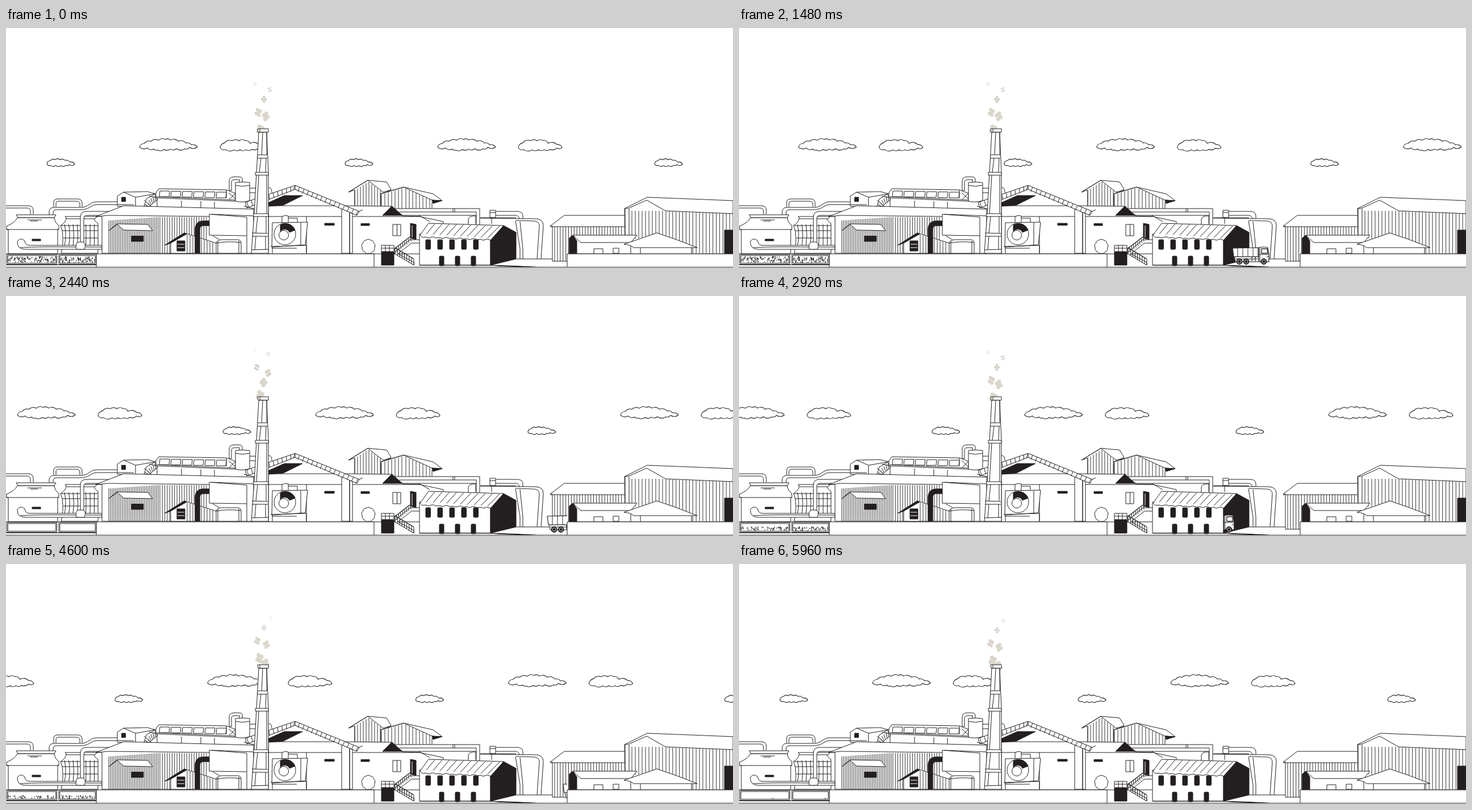
Write an HTML page that moves like this. It is 1280x424 px and loops after 6000 ms.

```html
<!DOCTYPE html>
<html lang="en">
<head>
<meta charset="utf-8">
<title>Factory skyline</title>
<style>
html, body { margin: 0; width: 100%; height: 100%; overflow: hidden; background: #fff; }
svg { display: block; width: 1280px; height: 424px; }
</style>
</head>
<body>
<svg id="stage" viewBox="0 0 1280 424" fill="none" stroke="#231f20" stroke-width="1" stroke-linejoin="round"></svg>
<script>
const INK = '#231f20', LOOP = 6000, STEP = 40;
const out = [];
const add = s => out.push(s);
const shape = (d, fill = '#fff', w = 1) => add(`<path d="${d}" fill="${fill}" stroke-width="${w}"/>`);
const line = (d, w) => shape(d, 'none', w);
const dark = d => shape(d, INK);
const box = (x, y, w, h, fill = '#fff', r = 0) =>
  add(`<rect x="${x}" y="${y}" width="${w}" height="${h}" rx="${r}" fill="${fill}"/>`);
const layer = id => add(`<g id="${id}"></g>`);
const mix = (a, b, k) => a + (b - a) * k;
const range = (n, f) => Array.from({ length: n }, (_, i) => f(i));

function seeded(s) {
  return () => (s = (s * 16807) % 2147483647) / 2147483647;
}

// Upright lines from a straight roof edge (x0, y0)-(x1, y1) down to the bottom.
function hatch(x0, y0, x1, y1, step, bottom, w = .9) {
  let d = '';
  for (let x = x0; x <= x1; x += step) d += `M${x.toFixed(1)} ${mix(y0, y1, (x - x0) / (x1 - x0)).toFixed(1)}V${bottom}`;
  line(d, w);
}

// Short strokes between the edges a-b and c-e.
function rungs(n, a, b, c, e) {
  line(range(n + 1, i => {
    const at = (p, q) => `${mix(p[0], q[0], i / n)} ${mix(p[1], q[1], i / n)}`;
    return `M${at(a, b)}L${at(c, e)}`;
  }).join(''));
}

// Closed outline of shallow outward bumps.
function puffy(pts) {
  return 'M' + pts[0] + pts.map((p, i) => {
    const q = pts[(i + 1) % pts.length];
    const r = Math.hypot(q[0] - p[0], q[1] - p[1]) * .8;
    return `A${r} ${r} 0 0 1 ${q}`;
  }).join('') + 'Z';
}

// A flat-bottomed cloud, full on the left and thin on the right.
function cloud(w, h, n, seed) {
  const rnd = seeded(seed), base = h * .68;
  const edge = (u, rise) => [
    w * u + (u % 1 ? (rnd() - .5) * w / n * .5 : 0),
    base + rise * h * Math.sin(Math.PI * u ** .8) + (u % 1 ? (rnd() - .5) * h * .1 : 0)
  ];
  return puffy([...range(n, i => edge(i / n, -.6)), ...range(n, i => edge(1 - i / n, .22))]);
}

function sky() {
  const parts = [[0, 196, cloud(102, 21, 9, 12)], [142, 197, cloud(77, 21, 7, 31)], [-163, 231, cloud(49, 14, 6, 8)]];
  const group = parts.map(([x, y, d]) => `<path d="${d}" transform="translate(${x} ${y})"/>`).join('');
  add('<g fill="#fff" stroke-width="1.1">' + `<g class="cloud">${group}</g>`.repeat(4) + '</g>');
}

function tanks() {
  line('M0 314H39Q48 314 48 322V329M0 318H37Q43 318 43 324V329');
  line('M84 316V308Q84 302 91 302H126Q134 302 134 310V316M88 316V310Q88 306 93 306H124Q130 306 130 311V316');
  line('M76 330V324Q77 317 84 317H135Q142 316 148 311Q152 307 160 307H196M83 330V325Q84 321 89 321H135Q144 320 150 315Q154 312 160 312H225');
  shape('M20 335Q16 344 1 350V356H4V399H91V356H93V349Q86 344 85 335Z');
  shape('M18 330H88L85 335H21Z');
  line('M1 356H93M38 339H63M43 341H56');
  box(46, 373, 15, 3, INK);
  shape('M106 336Q105 344 96 349L99 358Q102 380 97 398H162V345Q156 342 155 336Z');
  shape('M104 333H160L157 337H107Z');
  line('M96 349H162M99 358H162M101 371H162');
  line(range(8, i => `M${103 + i * 7.5} 347q${4 - i * .6} 18 0 38`).join(''));
  shape('M131 380V334Q131 324 142 324H190L165 331H143Q137 331 137 336V380Z');
  shape('M20 377Q26 369 33 376Q34 384 41 384H169V391H35Q19 391 20 377Z');
  line('M25 388Q60 386 124 387M140 387H169');
  shape('M124 391Q121 380 128 378H135Q142 380 138 391Z');
}

function backLeft() {
  shape('M196 307V297L207 290L249 289L263 293L228 299V315H196Z');
  line('M207 290L228 299');
  box(203.5, 299, 7, 7.5, INK);
  shape('M243 315L247 302L266 291V304L252 315Z');
  rungs(6, [244, 311], [266, 291], [250, 315], [266, 304]);
  line('M243 304L256 315M252 297L266 300');
  shape('M269 284L388 286L404 292V306L264 300V291Z');
  line('M265 298L404 304M388 286V301M266 304V318M343 306V318M367 307V319M309 305V316');
  range(6, i => shape(`M${271 + i * 20} ${288 + i * .4}h17l-1 10h-17Z`));
  line('M392 291L404 302M404 292L392 304');
  shape('M393 287V271Q393 263 401 263H411Q416 263 416 268V273H411V268H402Q397 268 397 273V287Z');
  shape('M404 273Q416 271 429 273V305Q416 309 404 306Z');
  line('M404 278Q416 281 429 278M429 283H459M429 291H456');
  line('M458 282H464Q468 283 468 291');
}

function shed() {
  shape('M158 333L207 314L436 320V398H169V333Z');
  line('M158 333L180 331L362 333');
  hatch(181, 340, 268, 334, 3, 398);
  hatch(271, 334, 356, 334, 4.3, 398);
  shape('M181 358L195 346L250 347L258 358L207 357L196 347Z');
  box(221, 367.5, 21, 9.5, INK);
  shape('M290 398V377L314 362L376 382V398Z');
  dark('M279 384L314 362L318 364L290 380Z');
  hatch(319, 365, 364, 379, 5, 398);
  box(301, 376, 14, 18, INK);
  add('<path d="M302 382H314M302 388H314" stroke="#fff"/>');
  shape('M358 329L424 334V367L358 366Z');
  line('M362 329L436 332');
  line('M337 398V356Q337 345 348 345H358', 9.5);
  shape('M370 398V379Q374 373 385 374H408Q414 374 414 381V398Z');
  line('M370 380Q391 376 414 379M373 376V398M410 376V398M364 367L376 374M424 367V398');
}

function middle() {
  shape('M603 290L637 269L670 272L678 285L660 296V318H614V286Z');
  hatch(614, 287, 637, 272, 5, 318);
  hatch(639, 272, 660, 288, 5, 318);
  line('M603 290L637 269L664 290L678 286');
  shape('M660 318V293L700 281L752 293L768 305L750 308V320H660Z');
  hatch(661, 294, 698, 283, 6, 319);
  hatch(704, 284, 748, 303, 6, 319);
  line('M659 293L700 281L750 304L768 305');
  dark('M750 304L768 305L752 310Z');
  shape('M685 319H834V350H698Z');
  line('M692 325H828V347M697 331H828M787 319V325M790 319V325');

  shape('M462 314L595 314L680 315L698 332L728 333L770 342V399H462Z');
  line('M462 333H728M529 333V398M727 331L746 342');
  dark('M663 331L679 315L698 331Z');
  box(561, 345, 17, 3.5, INK);
  box(625, 345.5, 15, 3.5, INK);
  box(681, 347, 14, 20);
  line('M688.5 347V367');
  dark('M461 309L490 296H522L488 313L462 315Z');
  shape('M591 320V398H605V326M605 326V398H610V328');
  shape('M421 308L509 278L622 324L618 331L509 285L424 318Z');
  rungs(11, [424, 307], [509, 278], [427, 317], [509, 286]);
  rungs(14, [509, 278], [620, 323], [506, 286], [616, 331]);
  line('M419 315L440 320M622 324L628 321');

  shape('M486 344V333Q491 330 497 332V344M497 336H513V344');
  shape('M469 344L531 343L527 383L468 387Z');
  line('M519 344V384M466 386L529 384V398M468 389L512 389M469 398V387');
  add('<circle cx="491" cy="364" r="19"/>');
  dark('M483 348A18 18 0 0 1 509 357L499 361A9 9 0 0 0 483 360Z');
  add('<circle cx="489" cy="366" r="8.5" fill="#fff"/>');
  shape(puffy(range(9, i => [638 - 11 * Math.sin(i * .7), 386 + 12 * Math.cos(i * .7)])));
}

function chimney() {
  shape('M445 184H459L462 256V398H432L437 328L441 256Z');
  shape('M443 178H462V184H444Z');
  line('M447 178V184M452 184L450 224M459 184V224M443 224H460M443 230H460M449 230L446 255M458 230L457 255');
  shape('M439 255L462 255V260H439Z');
  line('M445 260L441 328M459 260V328');
  shape('M436 328H462V333H435Z');
  line('M443 333L440 362M458 333V362M433 362L461 363M433 368H461M440 368L438 392M457 368V392M432 392L462 391');
}

function frontHouse() {
  box(661, 395, 22, 24, INK);
  line('M661 395V384H683V395M661 389H683M668 384V395M675 384V395');
  dark('M712 345L722 347V374L712 371Z');
  add('<path d="M715 349V370" stroke="#fff"/>');
  shape('M711 374H733V380H714L690 399L718 414V419L683 398Z');
  rungs(8, [684, 390], [712, 370], [685, 398], [713, 377]);
  rungs(8, [685, 388], [718, 408], [685, 400], [718, 419]);
  line('M684 390L711 369M685 388L718 408', 1.3);
  line('M814 347V338Q815 333 822 332H827V346M835 335H898');
  shape('M728 419V364H853V419Z');
  dark('M853 374L876 349L898 361V408L853 419Z');
  shape('M729 366L744 345L876 349L853 375' + 'q-6 -4 -12 0q-6 -3 -12 -1'.repeat(5) + 'Z');
  rungs(9, [755, 346], [869, 350], [740, 364], [848, 371]);
  range(5, i => box(739 + i * 21, 374, 8.5, 17, INK, 1.5));
  range(3, i => box(763 + i * 28, 403, 8, 17, INK, 1.5));
  line('M728 419H853');
}

function rightPipes() {
  shape('M852 322H862V335H852Z');
  line('M852 326H862M855 335V346M862 324H900Q910 324 910 332V337M862 331H897Q903 331 904 337');
  line('M835 336L932 337Q946 337 946 349L942 408M898 340L930 341Q939 342 939 350L935 408');
  line('M897 340L905 390V408M905 342L910 390V408M898 408H988');
}

function rightSide() {
  shape('M958 350L983 331H1090V412H962V350Z');
  line('M958 351H1090');
  hatch(966, 351, 1088, 351, 4.9, 412);
  shape('M1089 319L1129 299L1280 305V399H1090Z');
  line('M1089 319L1097 318L1128 304L1161 323L1280 328M1097 319V398M1090 319V366');
  hatch(1102, 323, 1158, 323, 6, 372);
  hatch(1162, 324, 1276, 328, 5.9, 398);
  box(1265, 357, 16, 42, INK);
  shape('M992 399V371L998 366H1111L1100 379V399Z');
  dark('M992 399V371L998 366L1005 376V399Z');
  line('M998 366L1012 379H1100');
  box(1035, 390, 16, 9);
  box(1069, 389, 10, 9);
  shape('M1117 399V387H1207V399Z');
  shape('M1088 382Q1120 371 1146 362Q1180 373 1217 388H1105Q1100 383 1088 382Z');
}

function truck() {
  add('<g class="truck">');
  shape('M3 404H62V413H5Z');
  line('M5 408H46M34 404V412M40 404V412', 1.2);
  shape('M0 389L45 388V404H2Z', '#fff', 1.2);
  hatch(9, 389, 36, 389, 9, 404);
  shape('M46 412V388Q54 386 62 388L64 400V413Z', '#fff', 1.2);
  line('M46 400H64M48 388V412M60 404H64');
  shape('M51 390H61L62 398H51Z', '#fff', 1.3);
  [12, 24, 55].forEach(x => add(`<g transform="translate(${x} 412.5)"><circle r="5" fill="${INK}"/>` +
    '<circle r="3" stroke="#fff" stroke-width=".8"/><circle r="1.2"/></g>'));
  add('</g>');
}

function ground() {
  box(159, 399, 489, 23.5);
  box(988, 399, 300, 23.5);
  line('M0 422.5H1280');
  dark('M853 419L898 420.5L935 422.5L870 420.5Z');
  [[1.5, 88], [93, 66]].forEach(([x, w]) => {
    box(x, 400, w, 17.5);
    box(x + 1.8, 402, w - 3.6, 13.5);
  });
  line('M0 399H159M0 418.5H159');
  layer('cane');
}

add('<clipPath id="road"><rect x="853" y="380" width="135" height="44"/></clipPath>');
sky();
backLeft();
tanks();
shed();
middle();
layer('smoke');
chimney();
rightPipes();
rightSide();
frontHouse();
add('<g clip-path="url(#road)">');
truck();
truck();
add('</g>');
ground();

const stage = document.getElementById('stage');
stage.innerHTML = out.join('');
const smoke = document.getElementById('smoke');
const cane = document.getElementById('cane');
const clouds = [...document.querySelectorAll('.cloud')];
const trucks = [...document.querySelectorAll('.truck')];

// Each cloud group drifts to the place of the one before it.
const cloudStops = [-290, 235, 760, 1305, 1845];
// Start position and speed in px per ms.
const drives = [[739.5, .0875], [507, .103]];

const SMOKE = 1440, PUFF_LIFE = 1700;
// Birth time and sideways lean.
const puffs = [[0, -1], [179, 1], [480, .2], [890, -1], [1016, .75]];

function puff(age, lean) {
  if (age > PUFF_LIFE) return '';
  const r = 5.6 * (1 - (age / PUFF_LIFE) ** 1.5);
  const x = 452 + lean * (4 + age * .0065), y = 182 - age * .056;
  const tone = [218, 214, 202].map(c => Math.round(mix(178, c, Math.min(1, r / 4))));
  return range(4, i => {
    const a = i * Math.PI / 2 + lean * .4;
    const cx = x + Math.cos(a) * (1.5 + r * .35), cy = y + Math.sin(a) * (2 + r * .7);
    return `<circle cx="${cx.toFixed(2)}" cy="${cy.toFixed(2)}" r="${(r * (.8 - i % 2 * .1)).toFixed(2)}" fill="rgb(${tone})"/>`;
  }).join('');
}

const rnd = seeded(71);
const stalks = range(210, () => ({ x: 4 + rnd() * 152, y: rnd() * 10, h: 1.5 + rnd() * 2 }))
  .filter(s => s.x < 87 || s.x > 96);
const FILL = 1750, FILL_START = 2400 - FILL;

function render(t) {
  const k = t / (LOOP - STEP);
  clouds.forEach((g, i) => g.setAttribute('transform', `translate(${mix(cloudStops[i + 1], cloudStops[i], k)} 0)`));
  trucks.forEach((g, i) => g.setAttribute('transform', `translate(${drives[i][0] + drives[i][1] * t} 0)`));

  const now = Math.max(t, STEP);
  smoke.innerHTML = '<g stroke="none">' + puffs.map(([born, lean]) => {
    const age = (now - born + SMOKE) % SMOKE;
    return puff(age + SMOKE, lean) + puff(age, lean);
  }).join('') + '</g>';

  const fill = (t - FILL_START + FILL) % FILL;
  const level = 11 * Math.min(1, (fill / 700) ** 2);
  const d = stalks.filter(s => s.y < level)
    .map(s => `M${s.x.toFixed(1)} ${(415.5 - s.y).toFixed(1)}v${-s.h.toFixed(1)}`).join('');
  cane.innerHTML = `<path d="${d}"/>`;
}

const start = performance.now();
function tick() {
  const t = (performance.now() - start) % LOOP;
  render(Math.floor(t / STEP) * STEP);
  requestAnimationFrame(tick);
}
render(0);
requestAnimationFrame(tick);
</script>
</body>
</html>
```
